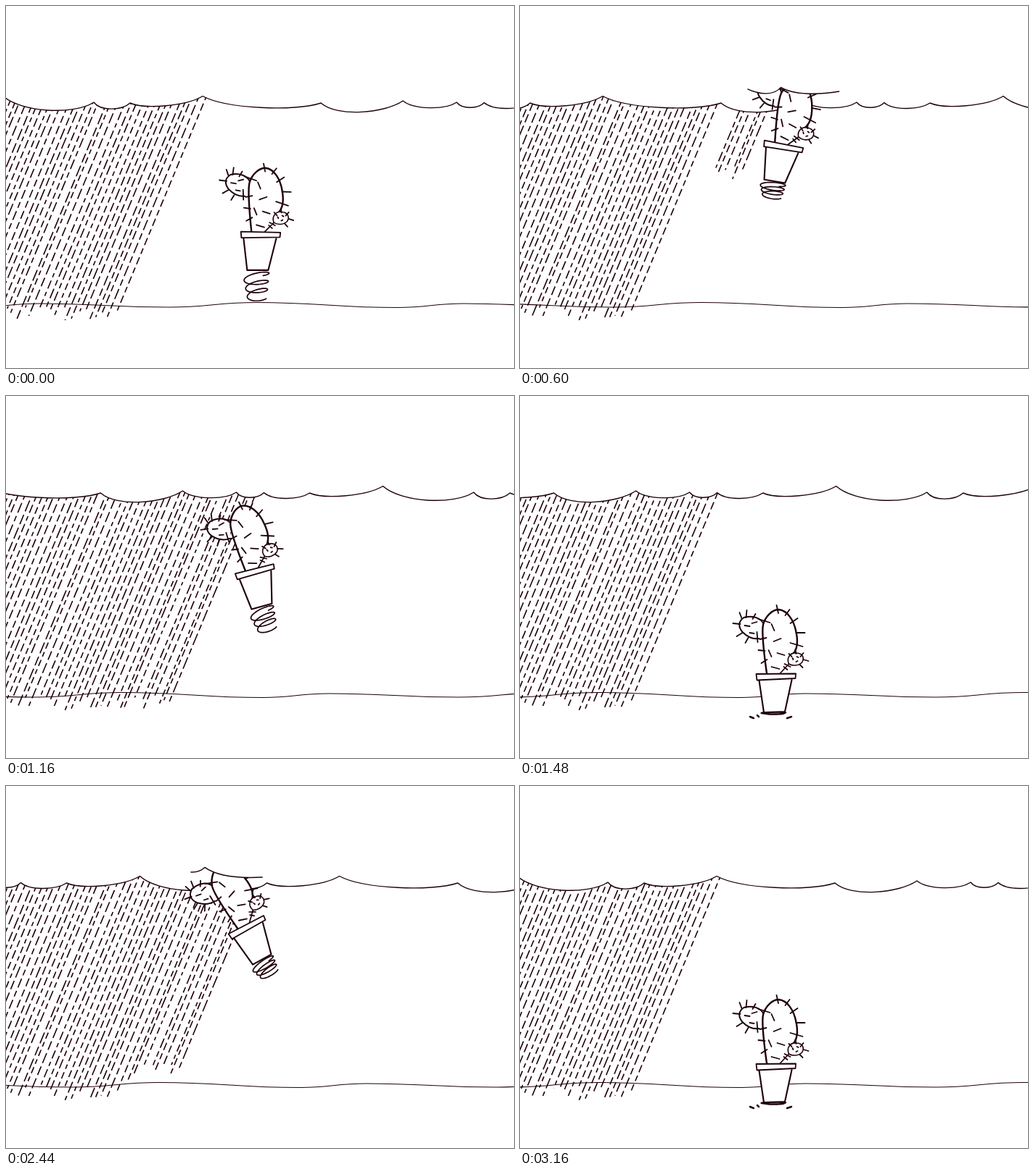
An HTML page with a canvas that plays this animation: 700x500 px, repeating every 3.2 s.

```html
<!DOCTYPE html>
<html lang="en">
<head>
<meta charset="utf-8">
<title>Hopping cactus</title>
<style>
html, body { margin: 0; width: 100%; height: 100%; overflow: hidden; background: #fff; }
canvas { display: block; }
</style>
</head>
<body>
<canvas id="stage" width="700" height="500"></canvas>
<script>
const ctx = document.getElementById('stage').getContext('2d');
const INK = '#1e000a', STEP = 40, FRAMES = 80, HOP = 40;
const CLOUD_W = 827, GROUND_W = 585, SLANT = 0.415;

// Cloud scallops: start x, start y, two control heights
const scallops = [
  [121, 133, 146, 144], [171, 134, 143, 138], [271, 124.5, 142, 146],
  [434, 134, 154, 148], [547, 131, 143, 144], [621, 133, 143, 142],
  [659, 133.5, 145, 143], [722, 134, 143, 138], [823, 124.5, 147, 151]
];
// Ground waves: alternating low and high points
const waves = [[45, 411], [225, 416], [345, 409.5], [540, 416.5]];
// Hop: frame, rim x, rim y, tilt in degrees, spring length
const hop = [
  [0, 350.5, 316.5, 2, 45], [5, 352, 262, 6, 37], [11, 357, 217, 11, 30],
  [15, 362.5, 195, 11.5, 26], [18, 350, 190, -8, 25], [21, 332.5, 195.5, -27, 27],
  [29, 343, 243, -13.5, 38], [35, 351, 318, -2, 44], [36, 352, 358, 0, 16],
  [37, 352.5, 388, 0, 4]
];

const body = new Path2D('M-12.5-5C-16-30-20-60-17.5-72C-14-85-4-93 4-93C16-92 25-78 28-62C31-48 29-38 24-32');
const bodyFill = new Path2D('M-12.5-5C-16-30-20-60-17.5-72C-14-85-4-93 4-93C16-92 25-78 28-62C31-48 29-38 24-32L6-5Z');
const arm = new Path2D('M-16-71C-20-83-34-85-44-82C-53-76-51-68-46-62C-38-54-30-52-23-53');
const bud = new Path2D('M18-18C14-27 21-34 28-33C37-33 40-26 36-20C31-15 23-15 18-18');
const stem = new Path2D('M18-18L6-5M12-18l8 4M11-14l5 4');
const pot = new Path2D('M-23 5L-16.5 49L12.5 48L22 4');
const rim = new Path2D('M-27-4L27.5-4.5L27 2L-26 4.5Z');
const spines = new Path2D(
  'M1-99L3.5-88M19-93L13-85M30-81L20-74M28-61L40-61M20-47L37-42' +
  'M-24-80L-8-75M-22-52L-13-54M-24-37L-15-36M-20-19L-12-24' +
  'M-6-73L-2-64M-3-49L7-53M-10-37L-6-28M2-33L12-30M-6-14L5-11' +
  'M-50-89L-47-81M-40-92L-41-82M-28-87L-32-80M-59-74L-49-73M-54-56L-46-61' +
  'M-42-47L-38-54M-26-62L-25-48M-43-71L-36-70M-33-74L-26-76M-36-61l6 1' +
  'M27-38L28-32M38-33L34-28M38-24L45-22M33-17L37-13M18-32L22-28M23-26l1 2M29-28l2 1M30-22l-2 1');
const hat = new Path2D('M-48 0C-28 10-10 11 0 0C18 11 48 12 80 8');
const hatFill = new Path2D('M-48 0C-28 10-10 11 0 0C18 11 48 12 80 8V-60H-48Z');
const debris = new Path2D('M317 443l5 2M327 441l2 2M368 445l6-2');

let seed = 7;
const rand = () => (seed = seed * 16807 % 2147483647) / 2147483647;

// One slanted dashed line per column; the late ones belong to the extra shower
const makeColumn = (x, extra) => {
  const long = 9 + rand() * 8;
  return {
    x: x + (rand() - 0.5) * 5, extra, end: 415 + rand() * 19, lag: rand() * 30,
    dash: [long, 5, long * (0.5 + rand() * 0.4), 5], offset: rand() * 30
  };
};
const rain = [];
for (let x = 2; x < 354; x += 8.4) rain.push(makeColumn(x, x > 273));

function draw(path, width, fill) {
  if (fill) {
    ctx.fillStyle = '#fff';
    ctx.fill(fill);
  }
  ctx.lineWidth = width;
  ctx.stroke(path);
}

function pose(p) {
  const last = hop.length - 1;
  let i = 0;
  while (i < last - 1 && p > hop[i + 1][0]) i++;
  const a = hop[i], b = hop[i + 1], span = b[0] - a[0];
  const u = Math.min(1, (p - a[0]) / span);
  const slope = (j, k) => {
    const l = hop[Math.max(0, j - 1)], r = hop[Math.min(last, j + 1)];
    return (r[k] - l[k]) / (r[0] - l[0]) * span;
  };
  return [1, 2, 3, 4].map(k =>
    a[k] * (1 + 2 * u) * (1 - u) ** 2 + slope(i, k) * u * (1 - u) ** 2 +
    b[k] * u * u * (3 - 2 * u) + slope(i + 1, k) * u * u * (u - 1));
}

// Repeats a row of points; bend adds the curve from one point to the next
function rowPath(points, width, shift, bend) {
  const path = new Path2D();
  for (let turn = -1; turn < 3; turn++) {
    points.forEach((point, i) => {
      const next = points[i + 1] || [points[0][0] + width, points[0][1]];
      const left = point[0] + turn * width - shift;
      if (turn === -1 && i === 0) path.moveTo(left, point[1]);
      bend(path, point, left, next[0] - point[0], next[1]);
    });
  }
  return path;
}

const cloudPath = shift => rowPath(scallops, CLOUD_W, shift, (path, [, , c1, c2], left, w, y) =>
  path.bezierCurveTo(left + w * 0.2, c1, left + w * 0.78, c2, left + w, y));

const groundPath = shift => rowPath(waves, GROUND_W, shift, (path, point, left, w, y) =>
  path.bezierCurveTo(left + w * 0.45, point[1], left + w * 0.55, y, left + w, y));

function drawRain(cloud, frame, p) {
  const under = new Path2D(cloud);
  under.lineTo(2000, 500);
  under.lineTo(-900, 500);
  ctx.save();
  ctx.clip(under);
  ctx.lineCap = 'butt';
  ctx.lineWidth = 1.6;
  for (const c of rain) {
    let top = 120, end = c.end;
    if (c.extra) {
      // The shower widens leftwards while it falls, then drains from the top
      if (p < 12 || c.x < 298 - 6 * (p - 15)) continue;
      end = Math.min(end, 125 + 27 * (p - 11.5) + c.lag);
      if (p > 30) top = 140 + (p - 30) * 45;
      if (top >= end) continue;
    }
    ctx.setLineDash(c.dash);
    ctx.lineDashOffset = c.offset + (top - 120) - frame % 2 * 13;
    ctx.beginPath();
    ctx.moveTo(c.x - (top - 135) * SLANT, top);
    ctx.lineTo(c.x - (end - 135) * SLANT, end);
    ctx.stroke();
  }
  ctx.restore();
}

function springPath(length) {
  const path = new Path2D(), turns = 3.1;
  const ry = Math.min(5, 1 + length * 0.11), lean = length * 0.06;
  for (let u = 0; u <= 1.001; u += 0.01) {
    const a = u * turns * 2 * Math.PI - 1, r = 18 - 5 * u;
    path.lineTo(-4 + 3 * u + r * Math.cos(a),
      48 + ry + u * (length - 2 * ry) - ry * Math.sin(a) - lean * Math.cos(a));
  }
  return path;
}

function drawCactus([x, y, tilt, length]) {
  ctx.save();
  ctx.translate(x, y);
  ctx.rotate(tilt * Math.PI / 180);
  draw(springPath(length), 1.7);
  draw(arm, 2, arm);
  draw(body, 2.4, bodyFill);
  draw(stem, 1.7);
  draw(bud, 1.6, bud);
  draw(spines, 1.8);
  draw(pot, 2.1, pot);
  draw(rim, 1.8, rim);
  ctx.restore();
}

function drawHat(p, [x, y, tilt]) {
  const a = tilt * Math.PI / 180, left = -38 - 0.7 * tilt;
  ctx.save();
  ctx.translate(x + 85 * Math.sin(a) - 20, 107 + 0.6 * (p - 18) ** 2);
  ctx.rotate(-a * 0.15);
  ctx.beginPath();
  ctx.rect(left, -70, 90 - left, 100);
  ctx.clip();
  draw(hat, 1.4, hatFill);
  ctx.restore();
}

function render(frame) {
  const p = frame % HOP, now = pose(p);
  const cloud = cloudPath(CLOUD_W * frame / (FRAMES - 1));
  ctx.fillStyle = '#fff';
  ctx.fillRect(0, 0, 700, 500);
  ctx.strokeStyle = INK;
  ctx.lineCap = ctx.lineJoin = 'round';
  drawRain(cloud, frame, p);
  draw(groundPath(Math.min(p, 37) * 6.4), 1.2);
  draw(cloud, 1.4);
  drawCactus(now);
  if (p >= 13 && p <= 23) drawHat(p, now);
  if (p >= 37) draw(debris, 2.5);
}

const start = performance.now();
function tick() {
  render(Math.floor((performance.now() - start) / STEP) % FRAMES);
  requestAnimationFrame(tick);
}
tick();
</script>
</body>
</html>
```
